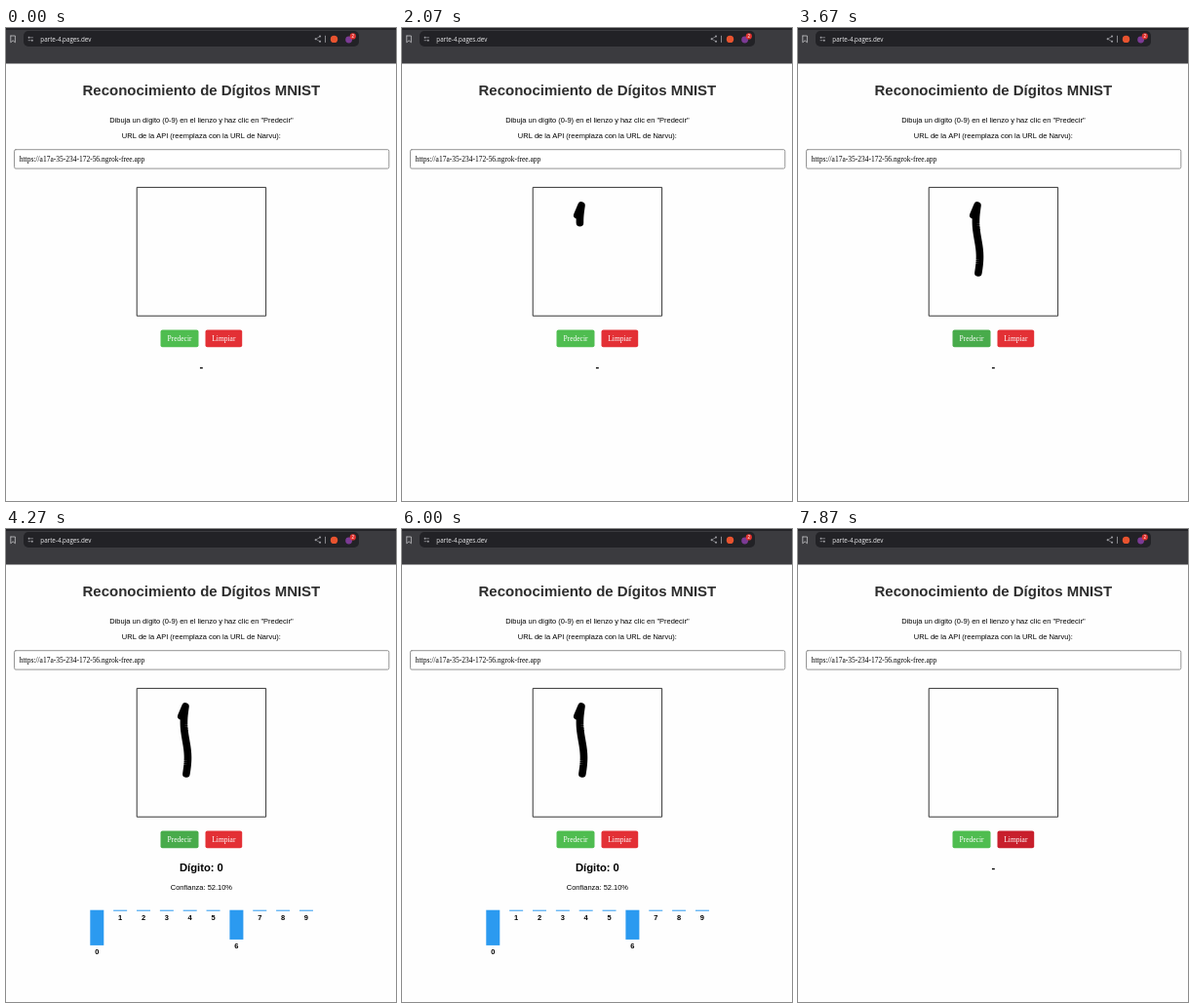
Write an HTML page with a canvas that moves like this. It is 400 by 485 pixels and loops after 8000 ms.

```html
<!DOCTYPE html>
<html lang="es">
<head>
<meta charset="utf-8">
<title>Reconocimiento de Dígitos MNIST</title>
<style>
  html, body { margin: 0; width: 100%; height: 100%; overflow: hidden; background: #fefefe; }
  canvas { display: block; width: 400px; height: 485px; }
</style>
</head>
<body>
<canvas id="stage"></canvas>
<script>
const W = 400, H = 485, LOOP = 8000, MID = 200.4;
const EM = 7.49;
const SANS = '"Liberation Sans", Arial, sans-serif';
const SERIF = '"Liberation Serif", "Times New Roman", serif';
const BODY = `${EM}px ${SANS}`;
const FORM = `${EM}px ${SERIF}`;
const BOLD = `bold ${EM}px ${SANS}`;
const RESULT_FONT = `bold ${EM * 1.5}px ${SANS}`;
const TITLE_FONT = `bold ${EM * 2}px ${SANS}`;

const HOOK_START = 1600, STROKE_START = 1760, STROKE_END = 2680;
const RESULT_AT = 4000, CLEAR_AT = 7800;
const CHANCES = { 0: 0.521, 6: 0.435 };

const canvas = document.getElementById('stage');
const ratio = window.devicePixelRatio || 1;
canvas.width = W * ratio;
canvas.height = H * ratio;
const ctx = canvas.getContext('2d');
ctx.scale(ratio, ratio);

const within = (t, a, b) => t >= a && t < b;
const progress = (t, a, b) => Math.min(1, Math.max(0, (t - a) / (b - a)));
const ease = u => (1 - Math.cos(Math.PI * u)) / 2;

function text(str, x, y, font, color = '#000', align = 'center') {
  ctx.font = font;
  ctx.fillStyle = color;
  ctx.textAlign = align;
  ctx.fillText(str, x, y);
}

function box(x, y, w, h, r, fill, stroke, lineWidth = 1) {
  ctx.beginPath();
  ctx.roundRect(x, y, w, h, r);
  if (fill) { ctx.fillStyle = fill; ctx.fill(); }
  if (stroke) { ctx.strokeStyle = stroke; ctx.lineWidth = lineWidth; ctx.stroke(); }
}

function dot(x, y, r, fill) {
  ctx.beginPath();
  ctx.arc(x, y, r, 0, Math.PI * 2);
  ctx.fillStyle = fill;
  ctx.fill();
}

function line(points, color, width) {
  ctx.beginPath();
  points.forEach(([x, y]) => ctx.lineTo(x, y));
  ctx.strokeStyle = color;
  ctx.lineWidth = width;
  ctx.lineCap = ctx.lineJoin = 'round';
  ctx.stroke();
}

function drawIcons() {
  const light = '#c4c4c7', dim = '#a0a0a5';
  // Bookmark
  line([[4.8, 8], [9.4, 8], [9.4, 14.8], [7.1, 12.8], [4.8, 14.8], [4.8, 8]], light, 0.8);
  // Site settings
  line([[25.2, 9.8], [27.6, 9.8]], dim, 0.7);
  line([[22.8, 12.7], [25.2, 12.7]], dim, 0.7);
  dot(23.6, 9.8, 1, dim);
  dot(26.8, 12.7, 1, dim);
  // Share
  const nodes = [[322, 8.6], [317.6, 11.2], [322, 13.8]];
  line(nodes, dim, 0.6);
  nodes.forEach(([x, y]) => dot(x, y, 1, dim));
  line([[327.5, 8], [327.5, 14.5]], dim, 0.8);
  // Extension buttons and badge
  dot(336.5, 11.4, 3.7, '#e8532f');
  dot(351.6, 12, 3.4, '#7b3a94');
  dot(355.8, 8.4, 3.1, '#e0322f');
  text('2', 355.8, 10.1, `4.5px ${SANS}`, '#fff');
}

function drawToolbar() {
  box(0, 0, W, 36.6, 0, '#3b3b3f');
  box(0, 0, W, 2, 0, '#242428');
  box(18, 3, 344, 16, 5, '#222226');
  drawIcons();
  text('parte-4.pages.dev', 35.3, 13.6, '6.25px "Open Sans", "Noto Sans", sans-serif', '#ececee', 'left');
}

function drawPage() {
  text('Reconocimiento de Dígitos MNIST', MID, 69, TITLE_FONT, '#2d2d2d');
  text('Dibuja un dígito (0-9) en el lienzo y haz clic en "Predecir"', MID, 97, BODY);
  text('URL de la API (reemplaza con la URL de Narvu):', MID, 113, BODY);
  box(8.5, 124.7, 384.3, 19.4, 1.5, '#fff', '#8a8a8a', 0.9);
  text('https://a17a-35-234-172-56.ngrok-free.app', 13.8, 136.9, FORM, '#000', 'left');
  box(134.6, 163.4, 132, 131.8, 0, null, '#2c2c2c', 0.95);
}

function drawButton(label, x, w, fill) {
  box(x, 309.4, w, 17.8, 2, fill);
  text(label, x + w / 2, 320.8, FORM, '#fff');
}

// A downstroke with one slow wave from top (0) to bottom (1)
const strokePoint = p => [184 - 1.8 * Math.sin(2 * Math.PI * p) + 0.9 * p, 182 + 69 * p];

function drawDigit(t) {
  if (!within(t, HOOK_START, CLEAR_AT)) return;
  const hook = [179.8, 192];
  const [topX, topY] = strokePoint(0);
  const k = progress(t, HOOK_START, STROKE_START);
  const path = [hook, [hook[0] + (topX - hook[0]) * k, hook[1] + (topY - hook[1]) * k]];
  const end = ease(progress(t, STROKE_START, STROKE_END));
  for (let i = 1; i <= 30 && end > 0; i++) path.push(strokePoint(end * i / 30));
  line(path, '#000', 7.6);
}

function drawResult(t) {
  if (!within(t, RESULT_AT, CLEAR_AT)) {
    text('-', MID, 351, RESULT_FONT);
    return;
  }
  text('Dígito: 0', MID, 351, RESULT_FONT);
  text('Confianza: 52.10%', MID, 370, BODY);
  for (let digit = 0; digit < 10; digit++) {
    const x = 93.3 + digit * 23.85;
    const h = Math.max(1, 69.5 * (CHANCES[digit] || 0));
    box(x - 7, 390.7, 14, h, 0, '#2b9af0');
    text(digit, x, 399.7 + h, BOLD);
  }
}

function draw(t) {
  box(0, 0, W, H, 0, '#fefefe');
  drawToolbar();
  drawPage();
  drawDigit(t);
  const hoverGreen = within(t, 3000, 4400);
  const hoverRed = within(t, 5470, 5670) || t >= 7270;
  drawButton('Predecir', 158.5, 39, hoverGreen ? '#48ab4b' : '#4fbd50');
  drawButton('Limpiar', 204.5, 37.7, hoverRed ? '#c81f2c' : '#e33035');
  drawResult(t);
}

const start = performance.now();
function tick() {
  draw((performance.now() - start) % LOOP);
  requestAnimationFrame(tick);
}
tick();
</script>
</body>
</html>
```
